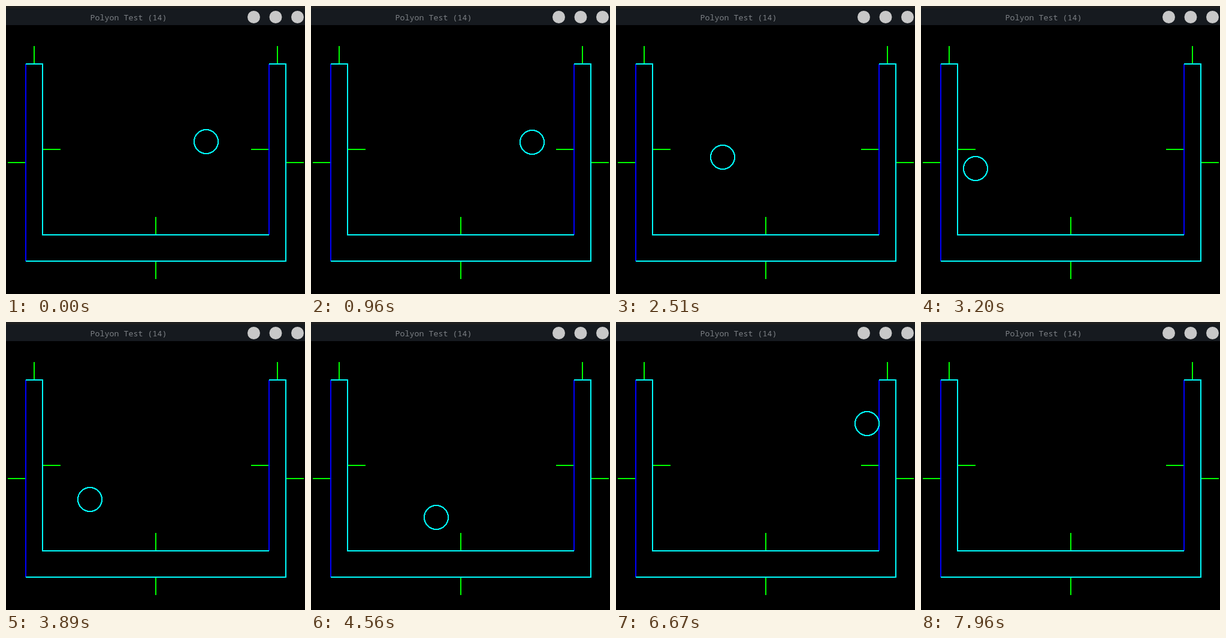
Write an HTML page that moves like this. It is 499x482 px and loops after 9150 ms.

```html
<!DOCTYPE html>
<html lang="en">
<head>
<meta charset="utf-8">
<title>Polyon Test</title>
<style>
  html, body { margin: 0; width: 100%; height: 100%; overflow: hidden; background: #000; }
  svg { display: block; }
  .lines { fill: none; stroke-width: 2; shape-rendering: crispEdges; }
  text { font: 300 13.33px "Noto Sans Mono", "DejaVu Sans Mono", monospace; fill: #7c8085; }
</style>
</head>
<body>
<svg width="499" height="482" viewBox="0 0 499 482">
  <g class="lines">
    <path stroke="#00f" d="M33 97V427M439 97V383"/>
    <path stroke="#0f0" d="M47 67V96M453 67V96M3 262H32M62 240H91M409 240H438M468 262H497M250 353V382M250 428V457"/>
    <path stroke="#0ff" d="M33 97H61M61 96V383M60 383H439M439 97H467M467 96V427M33 427H468"/>
    <circle id="ball" r="20" stroke="#0ff"/>
  </g>
  <rect width="499" height="32" fill="#161a1f"/>
  <rect width="499" height="4" fill="#1e1e1e"/>
  <text x="140.5" y="24">Polyon Test (14)</text>
  <g fill="#c8c8c8">
    <circle cx="413.5" cy="18.5" r="10.5"/>
    <circle cx="450" cy="18.5" r="10.5"/>
    <circle cx="486.5" cy="18.5" r="10.5"/>
  </g>
</svg>
<script>
const LOOP = 9150, TICK = 20, GRAVITY = 11.3;
const ball = document.getElementById("ball");

// Each leg: start time (s), start position (px), velocity (px/s).
const legsX = [[0, 334, 160], [0.544, 421, -124.3], [3.289, 79.8, 101.6], [6.648, 421, -189]];
const legsY = [[0, 227, -3.9], [5.266, 363.5, -146.6]];

function position(legs, t, accel) {
  const [start, from, speed] = legs.filter(leg => leg[0] <= t).pop();
  const dt = t - start;
  return from + speed * dt + accel * dt * dt / 2;
}

function draw(now) {
  const ms = now % LOOP;
  const t = Math.floor(ms / TICK) * TICK / 1000;
  ball.setAttribute("cx", Math.round(position(legsX, t, 0)));
  ball.setAttribute("cy", Math.round(position(legsY, t, GRAVITY)));
  ball.style.display = ms < 7960 ? "" : "none";
}

let begin;
function frame(now) {
  begin ??= now;
  draw(now - begin);
  requestAnimationFrame(frame);
}
draw(0);
requestAnimationFrame(frame);
</script>
</body>
</html>
```
